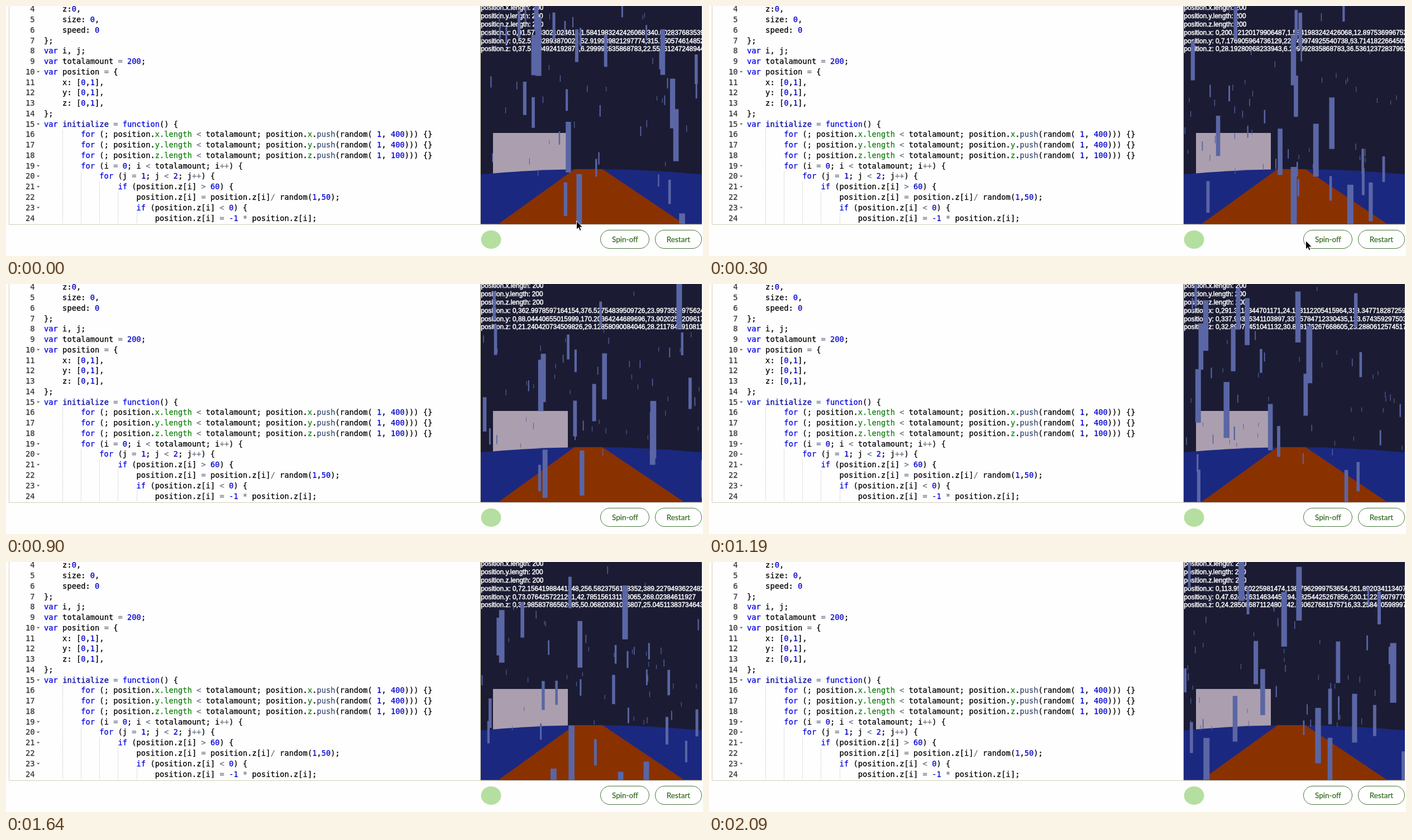
Recreate the animation shown at these times as an HTML page. Size 1248 px wide and 449 px high, loop 2190 ms.

```html
<!DOCTYPE html>
<html lang="en">
<head>
<meta charset="utf-8">
<title>Rain editor</title>
<style>
  html, body { margin: 0; width: 100%; height: 100%; overflow: hidden; background: #fefefe; }
  svg { display: block; width: 1248px; height: 449px; }
  text { white-space: pre; fill: currentColor; stroke: currentColor; stroke-width: .25px; }
  tspan { fill: currentColor; stroke: currentColor; }
  .code { font: 13.75px "DejaVu Sans Mono", monospace; color: #000; }
  .num { text-anchor: end; color: #333; }
  .key { color: #0000e6; }
  .val { color: #0000cd; }
  .op { color: #687687; }
  .prop { color: #13800f; }
  .fn { color: #3c4c72; }
  .name { color: #0000a2; }
  .log { font: 11.86px "Liberation Sans", Arial, sans-serif; color: #fff; stroke-width: .5px; }
  .btn { font: 13.5px Lato, sans-serif; color: #356b22; text-anchor: middle; }
</style>
</head>
<body>
<svg viewBox="0 0 1248 449">
  <defs><clipPath id="view"><rect x="850" width="396" height="391.5"/></clipPath></defs>
  <g id="editor"></g>
  <path d="M5.5 0V392.5H1246M849.5 0V392" fill="none" stroke="#d3cfb4"/>
  <g clip-path="url(#view)">
    <path d="M850 0h396v392h-396z" fill="#1b1c33"/>
    <path d="M872 228h134v80h-134z" fill="#ab9faf"/>
    <path d="M850 302.5Q1048 283.5 1246 302.5V392H850z" fill="#1b2880"/>
    <path d="M1018 293h50L1215 392H881z" fill="#8a3100"/>
    <g id="log"></g>
    <path id="rain" fill="#5a66a5"/>
  </g>
  <ellipse cx="868.5" cy="419.5" rx="18" ry="16.5" fill="#b5dfa0"/>
  <g fill="#fff" stroke="#45773a">
    <rect x="1064.5" y="402.5" width="87" height="33" rx="16.5"/>
    <rect x="1162.5" y="402.5" width="83" height="33" rx="16.5"/>
  </g>
  <text class="btn" x="1108.5" y="424">Spin-off</text>
  <text class="btn" x="1204" y="424">Restart</text>
  <path id="cursor" d="M0 0V15.5L3.6 12.2L6 17.6L8.6 16.5L6.2 11.2H11z" fill="#000" stroke="#fff"/>
</svg>
<script>
const $ = id => document.getElementById(id);
const LOOP = 2190, TICKS = 15;
const FALL = 13.3;   // drop per tick for each unit of depth
const SCALE = .988;  // sketch units to pixels
const DROPS = 68, NEAR = 20;

const CODE = `    z:0,
    size: 0,
    speed: 0
};
var i, j;
var totalamount = 200;
var position = {
    x: [0,1],
    y: [0,1],
    z: [0,1],
};
var initialize = function() {
        for (; position.x.length < totalamount; position.x.push(random( 1, 400))) {}
        for (; position.y.length < totalamount; position.y.push(random( 1, 400))) {}
        for (; position.z.length < totalamount; position.z.push(random( 1, 100))) {}
        for (i = 0; i < totalamount; i++) {
            for (j = 1; j < 2; j++) {
                if (position.z[i] > 60) {
                    position.z[i] = position.z[i]/ random(1,50);
                    if (position.z[i] < 0) {
                        position.z[i] = -1 * position.z[i];`.split("\n");

const TOKEN = /\b(var|for|if|function)\b|(-?\b\d+\b|-\d+)|(\b[xyz]\.length|\b[xyz](?=\.push))|\b(push)\b|\b(initialize)\b|(\+\+|[<>=*\/])/g;
const STYLES = ["key", "val", "prop", "fn", "name", "op"];

const esc = s => s.replace(/</g, "&lt;").replace(/>/g, "&gt;");

function paint(line) {
  let out = "", last = 0;
  for (const m of line.matchAll(TOKEN)) {
    const style = STYLES[m.slice(1).findIndex(Boolean)];
    out += esc(line.slice(last, m.index)) + `<tspan class="${style}">${esc(m[0])}</tspan>`;
    last = m.index + m[0].length;
  }
  return out + esc(line.slice(last));
}

function drawEditor() {
  $("editor").innerHTML = CODE.map((line, i) => {
    const y = 10.3 + i * 18.76, indent = line.search(/\S/);
    let out = `<text class="code num" x="51.5" y="${y}">${i + 4}</text>`;
    out += `<text class="code" x="68" y="${y}">${paint(line)}</text>`;
    if (line.endsWith("{")) out += `<path d="M55 ${y - 6}h5.4l-2.7 3z" fill="#666"/>`;
    for (let c = 4; c < indent; c += 4)
      out += `<path d="M${Math.round(68 + c * 8.278) + .5} ${y - 14}v18.7" stroke="#c4c4c4" stroke-dasharray="1 1"/>`;
    return out;
  }).join("");
}

let seed = 20;
function random() {
  seed = (seed + 0x6d2b79f5) | 0;
  let t = Math.imul(seed ^ seed >>> 15, seed | 1);
  t ^= t + Math.imul(t ^ t >>> 7, t | 61);
  return ((t ^ t >>> 14) >>> 0) / 2 ** 32;
}

// Far drops land nearer the horizon
const floor = z => 290 + z * 2;

function spawn(i) {
  const z = i < NEAR ? 20 + 36 * random() : 4 + 14 * random() ** 3;
  return { x: random() * 400, y: random() * (floor(z) + z) - z, z };
}

const next = (drop, i) => {
  const y = drop.y + FALL * drop.z;
  return y < floor(drop.z) ? { ...drop, y } : spawn(i);
};

// The first three drops are the ones printed at the top
const first = [
  { x: 91.57733021024615, y: 52.52532893870026, z: 37.51094924192876 },
  { x: 1.5841983242426068, y: 52.919939821297774, z: 6.299992835868783 },
  { x: 340.00283768353915, y: 315.7505746148523, z: 22.55361247248944 }
];

function simulate() {
  let drops = Array.from({ length: DROPS }, (_, i) => first[i] || spawn(i));
  return Array.from({ length: TICKS }, () => {
    const now = drops;
    drops = drops.map(next);
    return now;
  });
}
const rain = simulate();

function drawLog(tick) {
  const axes = ["x", "y", "z"], drops = rain[tick].slice(0, 3);
  const lines = axes.map(a => `position.${a}.length: 200`)
    .concat(axes.map(a => `position.${a}: 0,${drops.map(d => d[a]).join(",")}`));
  $("log").innerHTML = lines.map((s, i) =>
    `<text class="log" x="850.3" y="${7.2 + i * 14.83}">${s}</text>`).join("");
}

function drawRain(tick) {
  $("rain").setAttribute("d", rain[tick].map(({ x, y, z }) => {
    const w = Math.max(1, z / 5), h = Math.max(7, z * 1.93);
    return `M${(850 + x * SCALE).toFixed(1)} ${(y * SCALE).toFixed(1)}h${w}v${h}h${-w}z`;
  }).join(""));
}

function drawCursor(tick) {
  const c = $("cursor");
  c.style.display = tick < 3 ? "" : "none";
  c.setAttribute("transform", tick < 2 ? "translate(1021.5 386)" : "translate(1068.5 421.5)");
}

// Ticks are 150 ms apart, except one that is 10 ms shorter
const tickAt = t => Math.floor((t < 1190 ? Math.min(t, 1199) : t + 10) / 150);

let shown = -1;
function draw(ms) {
  const tick = Math.min(TICKS - 1, tickAt(ms % LOOP));
  if (tick === shown) return;
  shown = tick;
  drawLog(tick);
  drawRain(tick);
  drawCursor(tick);
}

drawEditor();
draw(0);
const start = performance.now();
requestAnimationFrame(function step(now) {
  draw(Math.max(0, now - start));
  requestAnimationFrame(step);
});
</script>
</body>
</html>
```
